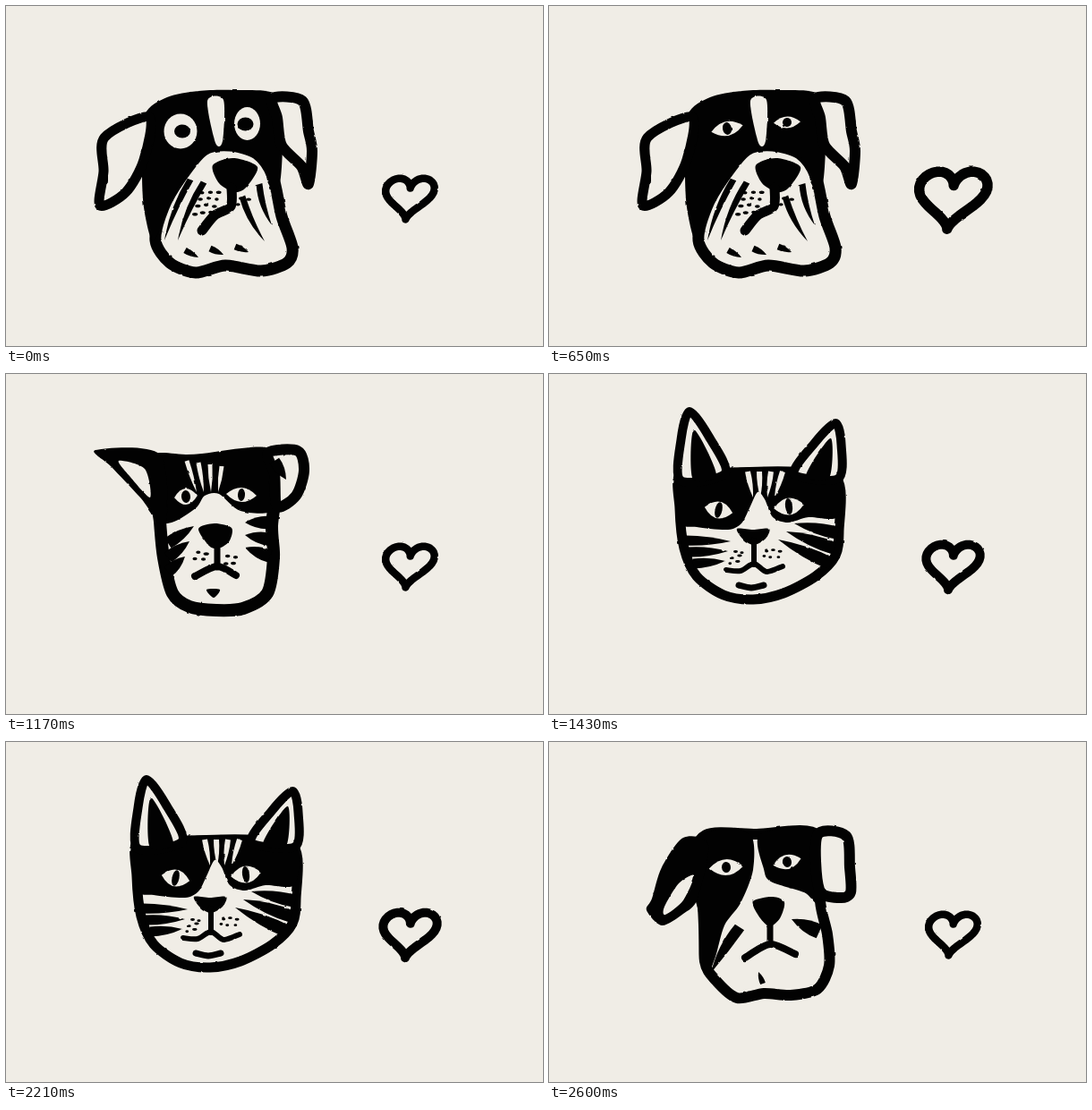
Animation, 600 px wide and 380 px high, one loop 2.73 s. Source, as an HTML page:

```html
<!DOCTYPE html>
<html lang="en">
<head>
<meta charset="utf-8">
<title>Dog, cat and heart</title>
<style>
  html, body { margin: 0; width: 100%; height: 100%; overflow: hidden; background: #f0ede6; }
  svg { display: block; width: 600px; height: 380px; }
</style>
</head>
<body>
<svg viewBox="0 0 600 380">
  <filter id="rough" x="0" y="0" width="600" height="380" filterUnits="userSpaceOnUse" color-interpolation-filters="sRGB">
    <feTurbulence type="fractalNoise" baseFrequency=".12" numOctaves="2" seed="4"/>
    <feDisplacementMap in="SourceGraphic" scale="2" xChannelSelector="R" yChannelSelector="G"/>
  </filter>
  <g id="art" filter="url(#rough)" stroke-linejoin="round" stroke-linecap="round"></g>
</svg>
<script>
const INK = '#020202', PAPER = '#f0ede6', STEP = 130, LOOP = 2730;
const art = document.getElementById('art');

const repeat = (n, make) => Array.from({ length: n }, (_, i) => make(i)).join('');
const lerp = (a, b, t) => a.map((v, k) => v + (b[k] - v) * t);
const toPoints = text => text.split(' ').map(s => s.split(',').map(Number));

let seed = 7;
const random = () => (seed = seed * 16807 % 2147483647) / 2147483647;

// Smooth path through key points
function curve(p, closed) {
  const n = p.length;
  const at = i => closed ? p[(i + n) % n] : p[Math.max(0, Math.min(n - 1, i))];
  const handle = (a, from, to) => a.map((v, k) => v + (to[k] - from[k]) / 7);
  let d = 'M' + p[0];
  for (let i = 0; i < (closed ? n : n - 1); i++) {
    const a = at(i), b = at(i + 1);
    d += `C${handle(a, at(i - 1), b)} ${handle(b, at(i + 2), a)} ${b}`;
  }
  return d + (closed ? 'Z' : '');
}

const path = (d, fill, width = 0) => `<path d="${d}" fill="${fill}" stroke="${INK}" stroke-width="${width}"/>`;
const ink = text => path(curve(toPoints(text), true), INK);
const paper = (text, outline) => path(curve(toPoints(text), true), PAPER, outline);
const line = (text, width) => path(curve(toPoints(text)), 'none', width);
const oval = (x, y, rx, ry, fill = INK) => `<ellipse cx="${x}" cy="${y}" rx="${rx}" ry="${ry}" fill="${fill}"/>`;

// Brush stroke, blunt at the start and pointed at the end
function stripe(x1, y1, x2, y2, w, bend = 0, fill = INK) {
  const len = Math.hypot(x2 - x1, y2 - y1), nx = (y1 - y2) / len, ny = (x2 - x1) / len;
  const off = (x, y, k) => `${x + nx * k},${y + ny * k}`;
  const mx = (x1 + x2) / 2, my = (y1 + y2) / 2;
  return path(`M${off(x1, y1, w / 2)}Q${off(mx, my, bend + w * .6)} ${x2},${y2}Q${off(mx, my, bend - w * .6)} ${off(x1, y1, -w / 2)}Z`, fill);
}

const eye = (x, y, rx, ry, tilt, pw, ph) => `<g transform="translate(${x} ${y}) rotate(${tilt})">
  ${path(`M${-rx},0Q0,${-2 * ry} ${rx},0Q0,${2 * ry} ${-rx},0Z`, PAPER)}${oval(0, 0, pw, ph)}</g>`;

const freckles = (x, y, cols, rows, dx, dy, r) => repeat(cols * rows, i => {
  const col = i % cols, row = Math.floor(i / cols);
  return oval(x + col * dx - row * 3 + random() * 2, y + row * dy + random() * 3, r + random(), r * .8);
});

function heart(size, weight) {
  const pts = Array.from({ length: 60 }, (_, i) => {
    const t = i / 60 * Math.PI * 2;
    const y = -.93 * size * (13 * Math.cos(t) - 5 * Math.cos(2 * t) - 2 * Math.cos(3 * t) - Math.cos(4 * t));
    return [450.5 + size * 16 * Math.sin(t) ** 3 - .15 * y, 211.5 + y];
  });
  return path(`M${pts.join(' ')}Z`, 'none', weight);
}

const specks = () => repeat(6, i => {
  const a = (i * 60 - 130) * Math.PI / 180, r = 86 + random() * 6;
  const x = 450 + r * Math.cos(a), y = 215 + r * Math.sin(a);
  return repeat(4, () => oval(x + random() * 8 - 4, y + random() * 6 - 3, 2 + random() * 2.5, 1.5 + random() * 2));
});

const dog = () =>
  paper('221,161 195,192 176,225 167,262 183,287 212,298 245,290 285,296 314,287 320,270 308,235 298,190 280,165 250,156', 13) +
  ink('155,122 180,102 215,95 255,94 302,99 309,140 306,198 294,200 284,171 250,160 222,166 192,203 173,248 163,262 154,225 152,180') +
  paper('160,124 110,147 109,185 105,223 134,208 154,172', 11) +
  paper('298,103 331,106 338,140 342,162 338,199 330,179 308,156 303,125', 12) +
  paper('225,106 243,105 242,151 234,153') +
  ink('231,178 254,170 281,180 268,203 255,208 238,198') +
  line('252,203 251,224 233,234 219,251', 11) +
  repeat(2, i => stripe(206 + 15 * i, 194 + 3 * i, 177 + 15 * i, 262, 7, 5)) +
  repeat(2, i => stripe(264 + 19 * i, 213 - 14 * i, 289 + 8 * i, 263 - 18 * i, 7, 5)) +
  freckles(219, 206, 3, 4, 9, 8, 2.2) + freckles(262, 214, 2, 2, 8, 7, 2) +
  repeat(3, i => stripe(200 + 28 * i, 273 - 2 * i, 215 + 28 * i, 281 - 3 * i, 7));

const pup = () =>
  paper('175,104 232,103 300,104 303,178 311,215 313,250 300,276 270,283 240,281 210,286 186,266 174,245 173,190 160,140', 12) +
  ink('160,113 195,97 226,105 228,143 214,180 196,205 186,240 176,262 169,240 166,185') +
  ink('236,103 300,100 302,178 285,168 248,156 240,142') +
  ink('150,107 126,140 115,175 109,188 126,205 150,192 166,175 178,115') +
  paper('162,149 145,158 129,184 130,193 150,177') +
  paper('300,104 332,105 336,140 337,168 325,174 302,165', 12) +
  ink('228,178 250,173 263,179 258,197 246,206 234,194') +
  line('247,203 247,226', 7) + line('219,241 247,226 275,237', 8) +
  stripe(213, 207, 181, 258, 12, 3) + stripe(302, 212, 271, 198, 16) + stripe(239, 270, 234, 257, 6) +
  eye(198, 140, 19, 9, -4, 5, 6) + eye(266, 134, 16, 8, -14, 5, 6);

const imp = () =>
  paper('168,105 235,96 300,98 297,170 299,205 292,245 265,262 235,264 205,260 186,245 176,205 172,165', 14) +
  ink('160,93 210,90 290,82 304,110 300,152 262,153 238,134 222,136 212,150 185,166 166,160') +
  ink('100,85 172,90 178,170 150,138 118,104') + paper('126,97 155,106 161,138 138,114') +
  paper('293,88 326,86 333,108 324,136 303,148 300,112', 12) + stripe(300, 97, 313, 118, 12) +
  repeat(3, i => stripe(181, 189 + 16 * i, 210 - 5 * i, 170 + 17 * i, 13)) +
  repeat(3, i => stripe(295, 166 + 19 * i, 267, 166 + 14 * i, 14)) +
  ink('215,173 233,167 252,172 250,186 240,194 228,193') +
  line('236,190 236,216', 7) + line('211,226 236,215 257,225', 8) +
  freckles(213, 199, 2, 2, 10, 7, 2.2) + freckles(247, 202, 2, 2, 9, 8, 2.2) +
  ink('224,241 239,241 232,250') +
  repeat(4, i => stripe(202 + 13 * i, 97 + 2 * i, 213 + 8 * i, 132, 5, 0, PAPER)) +
  eye(201, 137, 13, 9, -5, 5, 7) + eye(263, 135, 17, 8, 3, 4, 7);

function catEar(left, right, tip) {
  const bulge = (base, dx) => lerp(base, [tip[0] + dx, tip[1]], .6);
  const outer = [left, bulge(left, -9), tip, bulge(right, 9), right];
  const middle = lerp(left, right, .55);
  const inner = [lerp(left, right, .27), lerp(middle, tip, .72), lerp(left, right, .8)];
  return path(curve(outer, true), PAPER, 10) + path(curve(inner, true), INK);
}

const cat = (leftTip, rightTip) =>
  paper('148,110 203,110 268,109 322,118 324,175 320,203 298,226 262,245 228,252 195,247 165,226 151,195 146,150', 11) +
  ink('146,112 203,105 268,105 323,112 323,159 290,160 267,166 250,160 241,140 233,132 224,150 215,167 200,174 165,171 146,165') +
  catEar([147, 119], [197, 111], [157, 42]) + catEar([274, 112], [323, 117], rightTip).replace('', '') .slice(0) +
  repeat(4, i => stripe(222 + 13 * i, 109, 228 + 8 * i, 138, 6, 0, PAPER)) +
  repeat(3, i => stripe(149 + 6 * i, 186 + 13 * i, 203 - 3 * i, 187 + 11 * i, 11)) +
  repeat(3, i => stripe(323 - 4 * i, 178 + 17 * i, 274 - 9 * i, 167 + 9 * i, 14)) +
  ink('210,173 228,174 246,173 242,184 229,191 217,185') +
  line('229,186 229,213', 6) + line('198,219 214,220 229,212 243,221 261,215', 6) +
  line('212,236 226,239 240,236', 7) +
  freckles(207, 197, 2, 3, 8, 6, 1.8) + freckles(242, 196, 3, 2, 8, 6, 1.8);

const catOpen = eye(189.5, 152, 16, 9.5, 12, 4, 9) + eye(268, 148, 17, 9.5, -8, 4, 9);

const layers = {
  dog: dog(),
  dogWide: oval(195, 140, 18.5, 19.5, PAPER) + oval(197, 140, 9, 7.5) + oval(269.5, 131.5, 14.5, 18.5, PAPER) + oval(267.5, 132, 9, 7.5),
  dogHalf: eye(199, 137, 18, 8, -12, 5, 7) + eye(266, 130, 15, 6.5, -3, 5, 5),
  pup: pup(),
  imp: imp(),
  kit: cat([124, 60], [331, 66]) + catOpen,
  cat: cat([157, 42], [320, 55]),
  catOpen,
  catShut: eye(189, 153, 17, 3, 8, 4, 2) + eye(268, 150, 17, 3, -8, 4, 2),
  small: heart(1.7, 8.5),
  mid: heart(1.88, 10),
  big: heart(2.38, 11.5),
  specks: specks()
};

art.innerHTML = Object.entries(layers).map(([name, parts]) => `<g id="${name}" visibility="hidden">${parts}</g>`).join('');

// Poses with the number of steps each one lasts
const poses = [
  ['dog dogWide small', 2],
  ['dog dogHalf mid', 1],
  ['dog dogHalf big specks', 2],
  ['dog dogHalf big', 1],
  ['dog dogHalf mid', 1],
  ['dog dogWide small', 1],
  ['pup small', 1],
  ['imp small', 1],
  ['kit small', 1],
  ['cat catOpen mid', 1],
  ['cat catShut big', 1],
  ['cat catShut big specks', 2],
  ['cat catShut big', 2],
  ['cat catOpen mid', 1],
  ['kit small', 1],
  ['imp small', 1],
  ['pup small', 1]
];
const steps = poses.flatMap(([names, count]) => Array(count).fill(names.split(' ')));

let shown = -1;
function tick() {
  const i = Math.floor(performance.now() % LOOP / STEP);
  if (i !== shown) {
    shown = i;
    for (const g of art.children) g.setAttribute('visibility', steps[i].includes(g.id) ? 'visible' : 'hidden');
  }
  requestAnimationFrame(tick);
}
tick();
</script>
</body>
</html>
```
